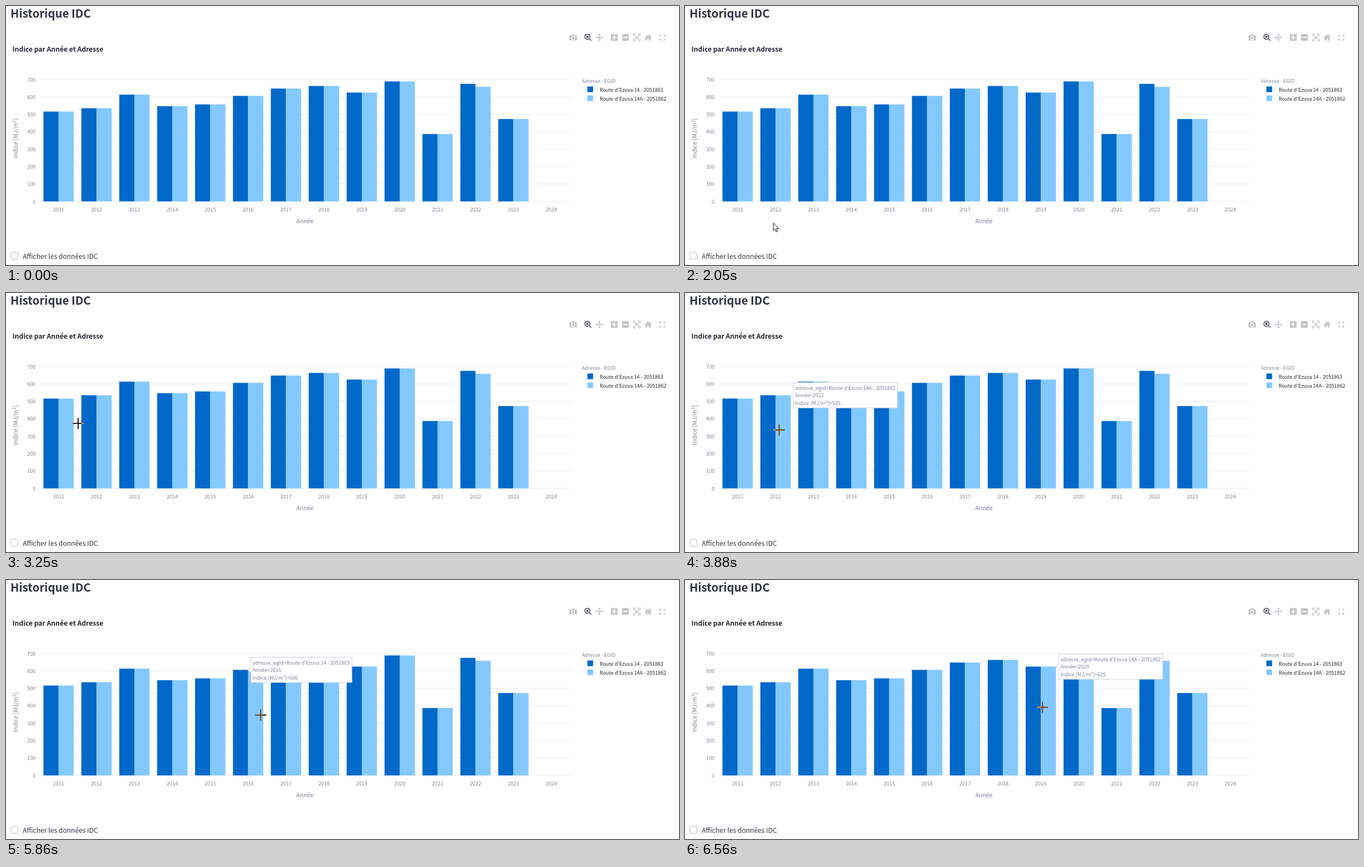
Write an HTML page with a canvas that moves like this. It is 1205x465 px and loops after 8000 ms.

```html
<!DOCTYPE html>
<html lang="fr">
<head>
<meta charset="utf-8">
<title>Historique IDC</title>
<style>
  html, body { margin: 0; width: 100%; height: 100%; overflow: hidden; background: #fff; }
  canvas { display: block; }
</style>
</head>
<body>
<canvas id="stage" width="1205" height="465"></canvas>
<script>
const ctx = document.getElementById('stage').getContext('2d');
const FONT = '"Noto Sans CJK JP", "Noto Sans CJK SC", "Noto Sans CJK", "Noto Sans", sans-serif';
const DARK = '#31333f', GRAY = '#808495', ICON = '#c1c2c5', ACTIVE = '#6f7079', GRID = '#e6eaf1';
const SMALL = 9.02;
const COLORS = ['#0068c9', '#83c9ff'];
const ADDRESSES = ["Route d'Ezuva 14 - 2051863", "Route d'Ezuva 14A - 2051862"];
const VALUES = [516, 535, 613, 547, 557, 606, 648, 663, 625, 689, 387, 675, 473, 0];
const LOOP = 8000, STEP = 70;

// The pointer passes smoothly through these places: step, x, y
const PATH = [
  [0, 966, 455], [8, 674, 445], [11, 563, 447], [24, 30, 355], [32, 102, 244],
  [46, 168.5, 246], [47, 170, 246], [52, 246, 247.6], [59, 456, 242.5], [68, 638, 229], [69, 640, 228.5]
];
const CROSSHAIR_FROM = 33;

const LEFT = 60.3, SLOT = 950 / 14, BAR = SLOT * 0.4;
const centerX = i => LEFT + SLOT * (i + 0.5);
const valueY = v => 350.8 - v * 0.3126;
const valueOf = (i, series) => i === 11 && series ? 658 : VALUES[i];

function text(str, x, y, size, color, align = 'left', weight = 400) {
  ctx.font = `${weight} ${size}px ${FONT}`;
  ctx.fillStyle = color;
  ctx.textAlign = align;
  ctx.fillText(str, x, y);
}

function rect(x, y, w, h, color) {
  ctx.fillStyle = color;
  ctx.fillRect(x, y, w, h);
}

function shape(d, x, y, fill, stroke, width = 1) {
  const path = new Path2D(d);
  ctx.save();
  ctx.translate(x, y);
  if (fill) { ctx.fillStyle = fill; ctx.fill(path); }
  if (stroke) { ctx.strokeStyle = stroke; ctx.lineWidth = width; ctx.stroke(path); }
  ctx.restore();
}

function drawToolbar() {
  const y = 56.5;
  shape('M-6.5-3.5h3l1-1.7h5l1 1.7h3v8.7h-13z', 1015.5, y, ICON);
  shape('M3 0A3 3 0 1 1-3 0A3 3 0 1 1 3 0z', 1015.5, y + 0.7, ICON, '#fff', 1.3);
  shape('M4.6 0A4.6 4.6 0 1 1-4.6 0A4.6 4.6 0 1 1 4.6 0zM3.3 3.3L7 7', 1041, y - 1.2, null, ACTIVE, 2);
  rect(1038.8, y - 3.4, 4.4, 4.4, ACTIVE);
  shape('M-5 0H5M0-5V5', 1062.5, y, null, ICON, 1.4);
  for (let i = 0; i < 4; i++) {
    ctx.save();
    ctx.translate(1062.5, y);
    ctx.rotate(i * Math.PI / 2);
    shape('M0-6.7l2.6 3h-5.2z', 0, 0, ICON);
    ctx.restore();
  }
  for (const x of [1089, 1109]) {
    shape('M-5-6H5Q6-6 6-5V5Q6 6 5 6H-5Q-6 6-6 5V-5Q-6-6-5-6z', x, y, ICON);
    shape(x < 1100 ? 'M-4 0H4M0-4V4' : 'M-4 0H4', x, y, null, '#fff', 2);
  }
  shape('M-6-2.5V-6H-2.5M2.5-6H6V-2.5M6 2.5V6H2.5M-2.5 6H-6V2.5M-4-4L4 4M4-4L-4 4', 1129.5, y, null, ICON, 1.4);
  shape('M0-5.5L6.5 0.3L5.6 1.3L0-3.6L-5.6 1.3L-6.5 0.3zM3-5h1.8v4H3zM-4.5 1L0-2.8L4.5 1V5.3H1.3V2H-1.3V5.3H-4.5z', 1149.5, y, ICON);
  shape('M-4.5-1.5V-4.3H-1.5M1.5-4.3H4.5V-1.5M4.5 1.5V4.3H1.5M-1.5 4.3H-4.5V1.5', 1175, y + 0.3, null, ICON, 1.5);
}

function drawPage() {
  rect(0, 0, 1205, 465, '#fff');
  text('Historique IDC', 8, 21, 20.3, DARK, 'left', 600);
  text('Indice par Année et Adresse', 11.5, 82, 12.07, '#262730', 'left', 600);
  drawToolbar();

  for (let v = 0; v <= 700; v += 100) {
    rect(LEFT, valueY(v) - 0.5, 950, 1, GRID);
    text(v, 53, valueY(v) + 3.7, SMALL, GRAY, 'right');
  }
  for (let i = 0; i < 14; i++) {
    for (const s of [0, 1]) {
      const top = valueY(valueOf(i, s));
      rect(centerX(i) + (s - 1) * BAR, top, BAR, valueY(0) - top, COLORS[s]);
    }
    text(2011 + i, centerX(i), 368.7, SMALL, GRAY, 'center');
  }
  text('Année', 535.3, 389.5, 10.53, GRAY, 'center');
  ctx.save();
  ctx.translate(21, 237.5);
  ctx.rotate(-Math.PI / 2);
  text('Indice [MJ/m²]', 0, 0, 10.53, GRAY, 'center');
  ctx.restore();

  text('Adresse - EGID', 1031, 138, SMALL, GRAY);
  ADDRESSES.forEach((name, s) => {
    rect(1041, 144.5 + 16 * s, 10.2, 10.2, COLORS[s]);
    text(name, 1063, 153.7 + 16.2 * s, SMALL, '#262730');
  });

  ctx.beginPath();
  ctx.roundRect(8.7, 442.2, 12.6, 12.6, 3);
  ctx.strokeStyle = '#b9bac0';
  ctx.lineWidth = 1;
  ctx.stroke();
  text('Afficher les données IDC', 30, 453.5, 12.04, DARK);
}

// Cubic spline through PATH
function pointerAt(step) {
  const end = Math.max(1, PATH.findIndex(p => p[0] >= step));
  const a = PATH[end - 1], b = PATH[end], span = b[0] - a[0];
  const before = PATH[end - 2] || a, after = PATH[end + 1] || b;
  const u = (step - a[0]) / span, v = 1 - u;
  return [1, 2].map(n => {
    const m0 = (b[n] - before[n]) / (b[0] - before[0]) * span;
    const m1 = (after[n] - a[n]) / (after[0] - a[0]) * span;
    return a[n] * v * v * (1 + 2 * u) + m0 * u * v * v + b[n] * u * u * (1 + 2 * v) - m1 * u * u * v;
  });
}

function drawPointer(step) {
  const [x, y] = pointerAt(step);
  if (step < CROSSHAIR_FROM) {
    shape('M0 0V13.4L3 10.7L5.3 16L7.6 15L5.4 9.9H9.4z', x, y, '#fff', '#111');
    return;
  }
  // The crosshair inverts whatever lies beneath it
  ctx.globalCompositeOperation = 'difference';
  shape('M-10-0.9H10V0.9H-10zM-0.9-10H0.9V10H-0.9z', x, y, '#fff');
  ctx.globalCompositeOperation = 'source-over';
}

// Describes the bar the pointer was on one step ago
function drawTooltip(step) {
  const pointerX = pointerAt(step - 1)[0];
  const i = Math.floor((pointerX - LEFT) / SLOT);
  const offset = pointerX - centerX(i);
  if (Math.abs(offset) > BAR) return;

  const series = offset > 0 ? 1 : 0, value = valueOf(i, series);
  const x = centerX(i) + series * BAR, y = valueY(value);
  const lines = ['adresse_egid=' + ADDRESSES[series], 'Année=' + (2011 + i), 'Indice [MJ/m²]=' + value];
  ctx.font = `400 ${SMALL}px ${FONT}`;
  const w = ctx.measureText(lines[0]).width + 6.5;
  shape(`M0 0L5-5V-22.7H${5 + w}V22.7H5V5z`, x, y, '#fff', '#cdcfd8');
  lines.forEach((line, n) => text(line, x + 7.8, y - 9.5 + 13.4 * n, SMALL, GRAY));
}

// Two bursts of movement with a pause between; positions change once per STEP
function stepAt(t) {
  return t < 5010
    ? Math.min(46, Math.floor((t - 650) / STEP))
    : Math.min(69, 47 + Math.floor((t - 5010) / STEP));
}

const start = performance.now();
function frame() {
  const step = stepAt((performance.now() - start) % LOOP);
  drawPage();
  if (step > CROSSHAIR_FROM) drawTooltip(step);
  if (step >= 0) drawPointer(step);
  requestAnimationFrame(frame);
}
frame();
</script>
</body>
</html>
```
